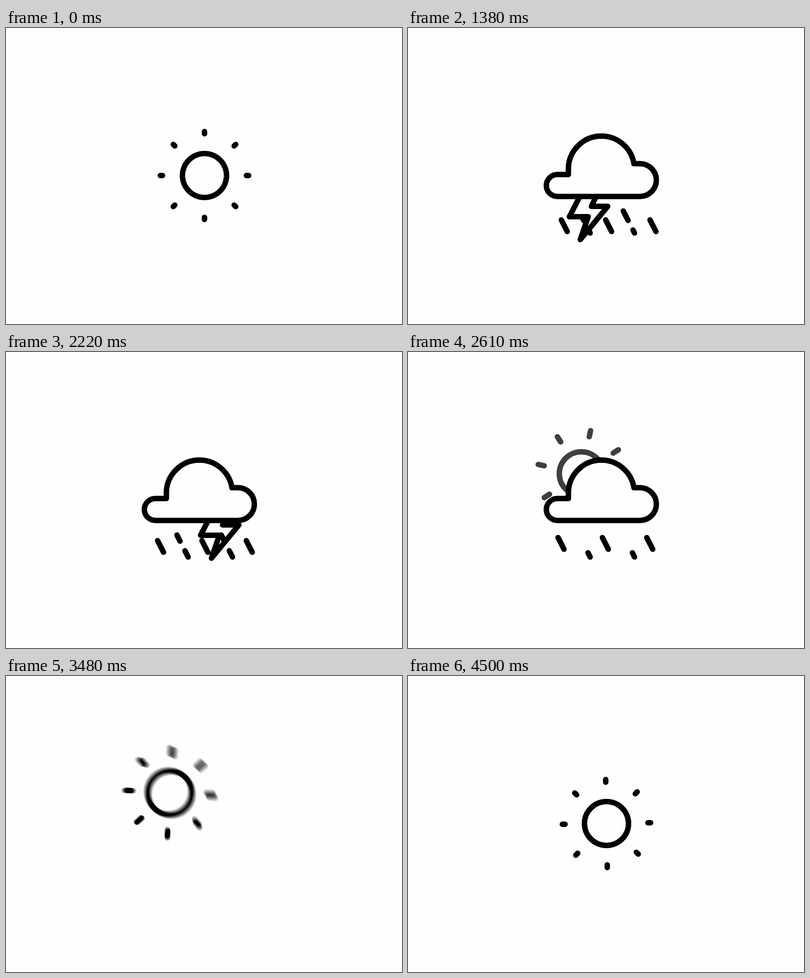
Write an HTML page with a canvas that moves like this. It is 800x600 px and loops after 4530 ms.

```html
<!DOCTYPE html>
<html lang="en">
<head>
<meta charset="utf-8">
<title>Weather loop</title>
<style>
  html, body { margin: 0; width: 100%; height: 100%; overflow: hidden; background: #fefefe; }
  canvas { display: block; }
</style>
</head>
<body>
<canvas id="stage" width="800" height="600"></canvas>
<script>
const LOOP = 4530, STEP = 30, WHITE = '#fefefe', STROKE = 11;
const HOME = [401, 299], BEHIND = [393, 272], CORNER = [325.5, 232];
const RING = 44.5, RAY_END = 89.2, RAY_LENGTH = 12.5;

const ctx = document.getElementById('stage').getContext('2d');
const layer = document.createElement('canvas');
layer.width = 800;
layer.height = 600;
const soft = layer.getContext('2d');

const cloudData = 'M391 219A67 67 0 0 1 456.5 275H468.5A33.25 33.25 0 0 1 468.5 341.5' +
  'H301.75A22.25 22.25 0 0 1 301.75 297H324V286A67 67 0 0 1 391 219Z';
const cloud = new Path2D(cloudData);
const bolt = new Path2D('M355 328L326 384H364L348 430.5L403.5 363H370.5L387 328Z');

const outline = (() => {
  const path = document.createElementNS('http://www.w3.org/2000/svg', 'path');
  path.setAttribute('d', cloudData);
  const total = path.getTotalLength(), count = 240;
  return Array.from({ length: count }, (_, i) => {
    const p = path.getPointAtLength(total * i / count);
    const a = 2 * Math.PI * i / count;
    return { x: p.x, y: p.y, rx: HOME[0] + RING * Math.sin(a), ry: HOME[1] - RING * Math.cos(a) };
  });
})();

const progress = (t, start, end) => Math.min(1, Math.max(0, (t - start) / (end - start)));
const easeOut = (u, power) => 1 - (1 - u) ** power;
const easeInOut = u => u < 0.5 ? 4 * u ** 3 : 1 - 4 * (1 - u) ** 3;
const smooth = u => u * u * (3 - 2 * u);
const mix = (a, b, u) => a + (b - a) * u;
const between = (p, q, u) => [mix(p[0], q[0], u), mix(p[1], q[1], u)];

function pen(c) {
  c.lineWidth = STROKE;
  c.lineCap = c.lineJoin = 'round';
  c.strokeStyle = '#000';
  c.fillStyle = WHITE;
}

function line(c, x1, y1, x2, y2) {
  c.beginPath();
  c.moveTo(x1, y1);
  c.lineTo(x2 + 0.01, y2);
  c.stroke();
}

function drawRays(c, [x, y], degrees, length) {
  if (length <= 0) return;
  c.save();
  c.translate(x, y);
  c.rotate(degrees * Math.PI / 180);
  c.lineWidth = STROKE * Math.min(1, length / 3);
  for (let i = 0; i < 8; i++) {
    line(c, 0, -RAY_END, 0, length - RAY_END);
    c.rotate(Math.PI / 4);
  }
  c.restore();
}

function drawSun(c, center, degrees, length) {
  c.beginPath();
  c.arc(center[0], center[1], RING, 0, 2 * Math.PI);
  c.stroke();
  drawRays(c, center, degrees, length);
}

// Rays shrink outward across the loop point
const rayLength = t => RAY_LENGTH * (1 - progress(t, 4050, 4650) ** 2);

function drawMorph(t) {
  const u = easeInOut(progress(t, 0, 600));
  ctx.beginPath();
  for (const p of outline) ctx.lineTo(mix(p.rx, p.x, u), mix(p.ry, p.y, u));
  ctx.closePath();
  ctx.stroke();
  drawRays(ctx, HOME, 0, rayLength(t + LOOP));
}

function drawRising(t) {
  if (t < 2370) return;
  const u = easeOut(progress(t, 2370, 3450), 4);
  ctx.globalAlpha = progress(t, 2370, 2690);
  soft.clearRect(0, 0, 800, 600);
  drawSun(soft, between(BEHIND, CORNER, u), 90 * u, RAY_LENGTH);
  ctx.drawImage(layer, 0, 0);
  ctx.globalAlpha = 1;
}

// Averages several instants to give motion blur
function drawReturning(t) {
  const samples = 17, shutter = 22;
  soft.clearRect(0, 0, 800, 600);
  soft.save();
  soft.globalCompositeOperation = 'lighter';
  soft.globalAlpha = 1 / samples;
  for (let i = 0; i < samples; i++) {
    const time = t + shutter * (i / (samples - 1) - 0.5);
    const u = easeOut(progress(time, 3465, 3870), 2);
    const p = between(CORNER, HOME, u), path = new Path2D();
    path.arc(p[0], p[1], RING, 0, 2 * Math.PI);
    soft.stroke(path);
    drawRays(soft, p, 45 * u, RAY_LENGTH);
  }
  soft.restore();
  ctx.drawImage(layer, 0, 0);
}

function drawRain(t) {
  if (t < 780 || t > 2850) return;
  const top = 371, low = 415.5, speed = 0.0945, period = 43, dash = 23.5;
  const front = Math.min(low, top + (t - 780) * speed);
  for (let i = 0; i < 5; i++) {
    const odd = i % 2;
    const cut = top + Math.max(0, t - (odd ? 2370 : 2577)) * 0.15;
    const travel = (t - 1380) * speed + 18 + odd * 20.5;
    const phase = ((travel % period) + period) % period;
    for (let k = -1; k < 2; k++) {
      const tail = top + phase + k * period;
      const a = Math.max(tail, cut), b = Math.min(tail + dash, front);
      if (b < a) continue;
      const x = y => 300.5 + 44.8 * i + (y - top) * 0.51;
      line(ctx, x(a), a, x(b), b);
    }
  }
}

function drawBolt(t, x, start, leave) {
  if (t < start || t >= leave + 270) return;
  const shown = easeOut(progress(t, start, start + 462), 3) - progress(t, leave, leave + 270) ** 3;
  ctx.save();
  ctx.translate(x, -90 * (1 - shown));
  ctx.fill(bolt);
  ctx.stroke(bolt);
  ctx.restore();
}

function drawCloud(t) {
  ctx.globalAlpha = 1 - progress(t, 2890, 3420);
  ctx.fill(cloud);
  ctx.stroke(cloud);
  ctx.globalAlpha = 1;
}

function draw(t) {
  ctx.fillStyle = WHITE;
  ctx.fillRect(0, 0, 800, 600);
  if (t < 600) {
    drawMorph(t);
  } else if (t < 3450) {
    drawRising(t);
    drawBolt(t, 67, 1640, 2080);
    drawRain(t);
    drawBolt(t, 0, 870, 1311);
    drawCloud(t);
  } else if (t < 3900) {
    drawReturning(t);
  } else {
    drawSun(ctx, HOME, 90 * smooth(progress(t, 4050, 4530)), rayLength(t));
  }
}

pen(ctx);
pen(soft);
const begin = performance.now();
function tick() {
  const t = Math.max(0, performance.now() - begin) % LOOP;
  draw(Math.floor(t / STEP) * STEP);
  requestAnimationFrame(tick);
}
tick();
</script>
</body>
</html>
```
